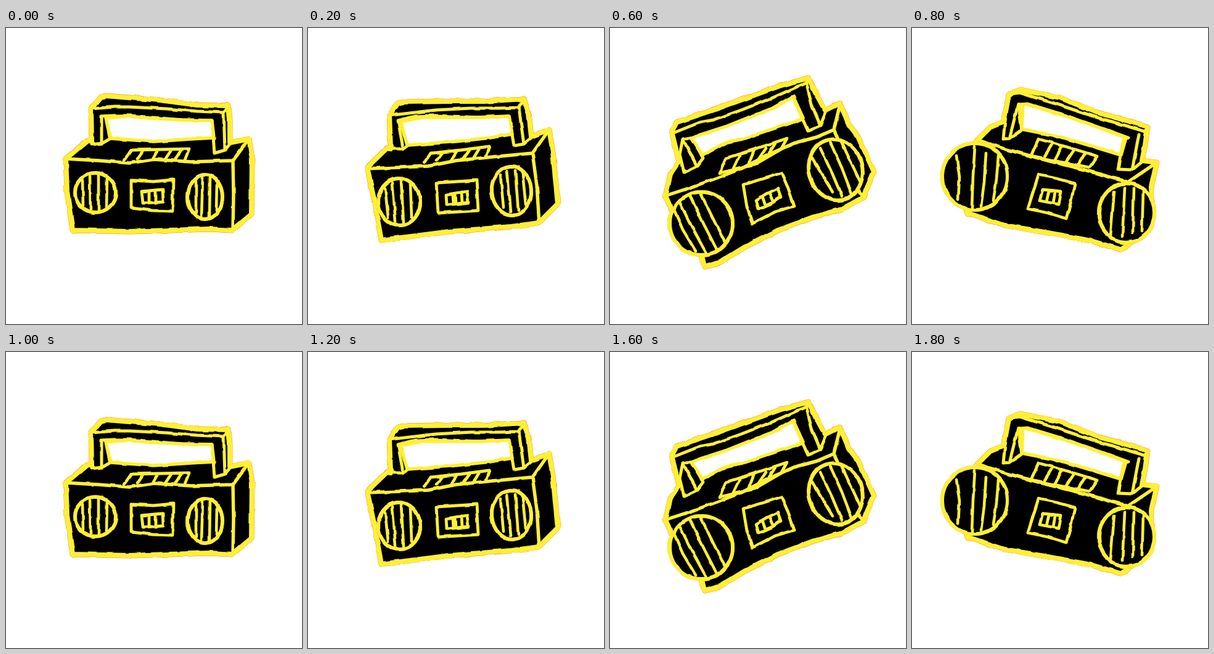
An HTML page for the animation above (2 s loop, 480x480 px).

```html
<!DOCTYPE html>
<html lang="en">
<head>
<meta charset="utf-8">
<title>Dancing boombox</title>
<style>
  html, body { margin: 0; width: 100%; height: 100%; overflow: hidden; background: #fff; }
  svg { display: block; width: 100vw; height: 100vh; }
</style>
</head>
<body>
<svg id="stage" viewBox="0 0 480 480" fill="none" stroke-linecap="round" stroke-linejoin="round">
  <filter id="wobble" filterUnits="userSpaceOnUse" x="0" y="0" width="480" height="480" color-interpolation-filters="sRGB">
    <feTurbulence type="fractalNoise" baseFrequency=".06" seed="4"/>
    <feDisplacementMap in="SourceGraphic" scale="4" xChannelSelector="R" yChannelSelector="G"/>
  </filter>
</svg>
<script>
const STEP = 200, YELLOW = '#fff035', FRINGE = '#ff7a1a';

// Speakers are "cx cy rx ry angle"; everything else is path data.
const upright = {
  body: 'M97 212L133 182L139 186L138 131L154 112L162 110L250 117L310 125L361 126L363 150L363 186L394 180L399 212L398 302L367 328L330 326L200 330L108 328L99 265Z',
  hole: 'M162 146L200 143L230 146L285 149L334 150L337 178L300 180L240 184L169 179Z',
  handle: 'M138 131L175 128L200 128L260 131L310 135L353 137L362 127M155 187L155 143L175 142L200 142L285 149L334 150L338 203L355 198L353 137M355 198L364 187M138 189L156 187L168 180',
  frame: 'M97 212L150 215L200 219L240 213L300 217L368 215L394 180M368 215L369 270L368 328',
  trim: 'M192 214L203 198L250 197L297 196L290 214M213 212L222 199M238 212L246 198M258 213L268 198M275 212L284 198M203 247L240 249L271 246L270 297L238 296L203 292ZM220 265L254 262L255 282L222 284ZM232 264L232 283M232 264L232 283M243 263L243 283',
  stripes: 'M124 247L125 288M136 241L137 295M150 238L150 296M164 243L163 290M308 248L308 300M319 242L317 306M331 243L330 306M342 250L341 296',
  speakers: ['145 267 33 32 0', '323 274 28 36 0']
};

const leaning = {
  body: 'M95 239L122 207L129 205L125 152L138 131L146 130L200 121L260 113L338 104L352 128L360 166L388 150L394 190L411 267L380 303L330 318L260 330L129 360L112 280Z',
  hole: 'M138 157L170 147L212 143L265 141L318 136L325 166L290 175L220 186L152 201Z',
  handle: 'M126 152L170 146L215 138L270 128L310 124L328 121L338 104M152 201L137 157L175 144L212 142L270 141L318 136L330 178L345 178L330 123M345 178L359 169M130 203L152 204L154 202',
  frame: 'M95 243L150 236L190 228L240 216L300 201L360 190L388 150M360 190L372 240L381 303',
  trim: 'M186 222L194 208L245 199L290 187L285 203M203 218L213 205M228 213L236 201M246 210L255 197M262 208L272 192M212 255L245 249L275 248L282 295L250 300L219 307ZM227 275L262 267L264 284L228 290ZM237 273L239 288M246 271L248 287M255 269L257 285',
  stripes: 'M125 272L134 325M137 260L146 332M152 257L160 333M167 262L173 324M315 227L326 281M326 220L340 290M340 218L352 286M353 221L364 275',
  speakers: ['151 296 34 44 -8', '337 253 35 43 -10']
};

const tilted = {
  body: 'M90 272L98 238L112 217L100 168L108 153L165 134L220 114L275 94L322 81L335 108L349 134L373 122L387 156L402 176L428 233L410 275L375 294L332 306L275 327L219 355L180 379L153 388L149 368L100 295Z',
  hole: 'M131 178L190 159L225 145L264 130L297 111L313 146L300 152L260 165L215 180L190 185L150 206Z',
  handle: 'M103 170L146 153L168 149L213 133L264 113L320 88M120 234L113 205L118 180L131 178L151 211L141 224L120 234M118 180L141 224M297 112L308 138L321 167L341 158L327 124L318 87M341 158L351 134',
  frame: 'M90 272L130 259L174 243L213 228L260 204L298 187L335 177L363 165L373 124M363 165L372 184M398 256L410 275',
  trim: 'M178 235L188 211L236 196L287 179L277 197L234 222ZM200 228L210 207M225 220L233 199M240 214L253 195M258 203L268 187M216 254L247 245L278 235L289 260L299 289L268 298L231 317L222 290ZM237 279L253 269L272 260L277 274L264 283L241 293ZM247 273L252 288M259 267L265 281',
  stripes: 'M104 295L118 327L139 362M113 283L134 325L156 365M130 273L152 318L173 359M148 270L168 311L186 347M328 211L345 240L361 266M341 195L360 235L376 273M357 185L376 227L392 269M374 182L391 218L406 250',
  speakers: ['148 317 51 51 0', '366 230 43 50 -18']
};

const swung = {
  body: 'M105 183L127 161L149 152L157 108L175 100L240 113L300 137L382 160L378 190L373 215L397 218L388 256L390 300L365 342L338 359L290 345L220 332L150 320L90 300L70 240Z',
  hole: 'M173 125L188 124L250 143L310 164L347 178L339 206L290 191L240 176L178 164Z',
  handle: 'M159 107L175 105L230 122L300 145L379 168M148 180L158 179L172 124L188 123L250 142L310 163L351 178L343 180L334 229L357 230L368 172M357 230L373 217M148 180L152 140M158 179L178 165L180 128',
  frame: 'M105 181L150 196L220 215L280 230L350 250L397 218M350 250L352 262',
  trim: 'M193 207L205 180L255 194L301 208L289 226L240 217ZM215 208L228 187M232 213L243 192M250 217L262 199M270 221L280 204M205 238L235 244L264 252L258 280L250 309L220 300L188 293ZM212 262L242 265L238 286L207 280ZM222 264L218 282M232 265L229 284',
  stripes: 'M72 206L77 242L75 278M102 192L99 240L97 292M120 203L117 250L112 289M140 208L137 245L132 280M328 265L325 300L322 336M345 259L341 338M360 260L358 332M375 264L373 330',
  speakers: ['102 241 53 54 0', '348 300 45 48 0']
};

// Halfway pose between two poses that share the same structure.
const middle = (a, b) => {
  const other = JSON.stringify(b).match(/-?\d+/g);
  let i = 0;
  return JSON.parse(JSON.stringify(a).replace(/-?\d+/g, n => Math.round((+n + +other[i++]) / 2)));
};

const path = (d, width, fill = 'none') => `<path d="${d}" stroke-width="${width}" fill="${fill}"/>`;

const ellipse = spec => {
  const [x, y, rx, ry, angle] = spec.split(' ');
  return `<ellipse rx="${rx}" ry="${ry}" transform="translate(${x} ${y}) rotate(${angle})" stroke-width="6" fill="#000"/>`;
};

// Draws a layer with a thin orange rim, then its yellow strokes on top.
const inked = layer =>
  `<g stroke="${FRINGE}">${layer(0.8)}</g><g stroke="${YELLOW}">${layer(0)}</g>`;

const drawing = p =>
  inked(rim =>
    path(p.body, 8 + rim, '#000') +
    path(p.hole, 5.5 + rim, '#fff') +
    path(p.handle, 5 + rim) +
    path(p.frame, 5.5 + rim) +
    path(p.trim, 4.8 + rim)) +
  inked(rim => p.speakers.map(ellipse).join('') + path(p.stripes, 4.6 + rim));

const poses = [upright, middle(upright, leaning), leaning, tilted, swung];
const groups = poses.map(pose => {
  const g = document.createElementNS('http://www.w3.org/2000/svg', 'g');
  g.setAttribute('filter', 'url(#wobble)');
  g.innerHTML = drawing(pose);
  return stage.appendChild(g);
});

function show() {
  const current = Math.floor(performance.now() / STEP) % groups.length;
  groups.forEach((g, i) => g.style.display = i === current ? '' : 'none');
  requestAnimationFrame(show);
}
show();
</script>
</body>
</html>
```
